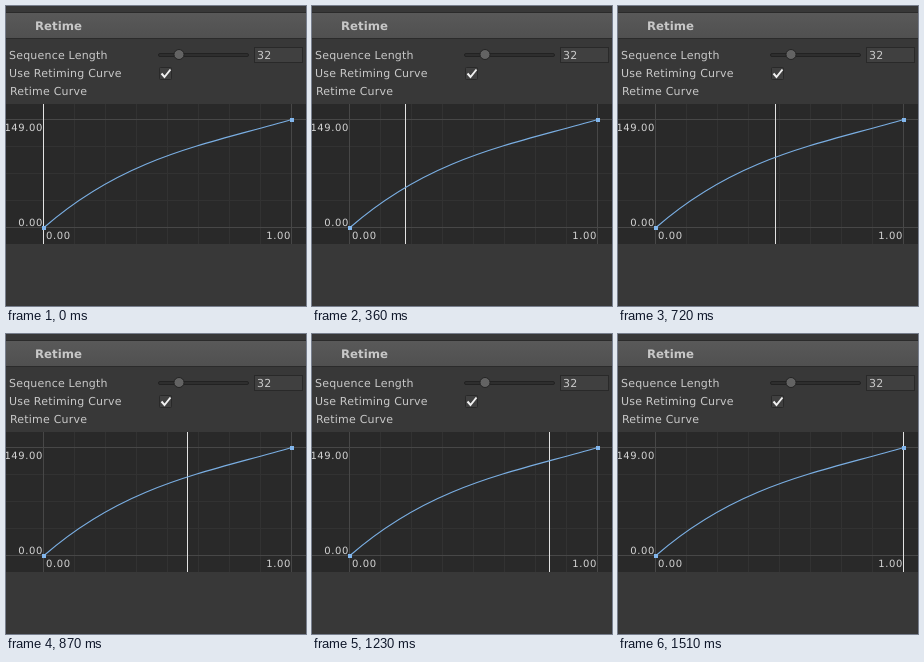
Write an HTML page that moves like this. It is 300 by 300 pixels and loops after 1560 ms.

```html
<!DOCTYPE html>
<html lang="en">
<head>
<meta charset="utf-8">
<title>Retime</title>
<style>
  html, body { margin: 0; width: 100%; height: 100%; overflow: hidden; background: #383838; }
  svg { display: block; width: 300px; height: 300px; }
  text { font: 11px "DejaVu Sans", sans-serif; letter-spacing: .2px; fill: #c8c8c8; text-rendering: geometricPrecision; }
  .title { font-size: 11.75px; font-weight: bold; letter-spacing: 0; }
  .tick { font-size: 10px; letter-spacing: .6px; fill: #d4d4d4; }
  .end { text-anchor: end; }
  .field { fill: #404040; stroke: #292929; }
  .key { fill: #82b6ec; }
</style>
</head>
<body>
<svg viewBox="0 0 300 300">
  <defs>
    <linearGradient id="bar" x2="0" y2="1">
      <stop stop-color="#595959"/>
      <stop offset="1" stop-color="#505050"/>
    </linearGradient>
  </defs>
  <rect width="300" height="300" fill="#383838"/>

  <rect y="6" width="300" height="27" fill="#2b2b2b"/>
  <rect y="7" width="300" height="25" fill="url(#bar)"/>
  <text class="title" x="29" y="24">Retime</text>

  <text x="3" y="53">Sequence Length</text>
  <rect x="152.5" y="47.5" width="90" height="3" rx="1.5" fill="#2e2e2e" stroke="#222"/>
  <circle cx="173" cy="48.5" r="5" fill="#636363" stroke="#242424"/>
  <rect class="field" x="248.5" y="41.5" width="48" height="15"/>
  <text x="251" y="53">32</text>

  <text x="3" y="71">Use Retiming Curve</text>
  <rect class="field" x="153.5" y="61.5" width="12" height="12" rx="1"/>
  <path d="M155.5 67.5L158.5 71L164.5 63.5" fill="none" stroke="#f0f0f0" stroke-width="2"/>

  <text x="4" y="89">Retime Curve</text>
  <rect y="98" width="300" height="140" fill="#292929"/>
  <g id="grid"></g>
  <rect id="cursor" x="37" y="98" width="1" height="140" fill="#e2e2e2"/>
  <path d="M38 221.5C120.5 149.5 203 138 285.5 113.5" fill="none" stroke="#7aaee2" stroke-width="1.2"/>
  <rect class="key" x="36" y="220" width="4" height="4"/>
  <rect class="key" x="284" y="112" width="4" height="4"/>
  <text class="tick end" x="37" y="125">149.00</text>
  <text class="tick end" x="37" y="220">0.00</text>
  <text class="tick" x="40" y="233">0.00</text>
  <text class="tick end" x="285" y="233">1.00</text>
</svg>
<script>
  const grid = document.getElementById('grid');
  function rule(x, y, width, height, major) {
    const r = document.createElementNS('http://www.w3.org/2000/svg', 'rect');
    const attrs = { x, y, width, height, fill: major ? '#474747' : '#323232' };
    for (const k in attrs) r.setAttribute(k, attrs[k]);
    grid.append(r);
  }
  // Minor rules first so the major ones stay unbroken.
  for (const major of [false, true]) {
    for (let i = 0; i <= 8; i++) if ((i % 8 === 0) === major) rule(37 + 31 * i, 98, 1, 140, major);
    for (let i = 0; i <= 4; i++) if ((i % 4 === 0) === major) rule(0, 113 + 27 * i, 300, 1, major);
  }

  // The cursor jumps 8 px per step; most steps hold for 50 ms.
  const STEPS = 32, LOOP = 1560;
  const holds = { 0: 30, 4: 30, 7: 80, 14: 30, 18: 30, 26: 80, 30: 30 };
  const frames = [];
  let time = 0;
  for (let i = 0; i < STEPS; i++) {
    frames.push({ offset: time / LOOP, transform: `translateX(${8 * i}px)`, easing: 'steps(1, end)' });
    time += holds[i] || 50;
  }
  frames.push({ offset: 1, transform: `translateX(${8 * (STEPS - 1)}px)` });
  document.getElementById('cursor').animate(frames, { duration: LOOP, iterations: Infinity });
</script>
</body>
</html>
```
